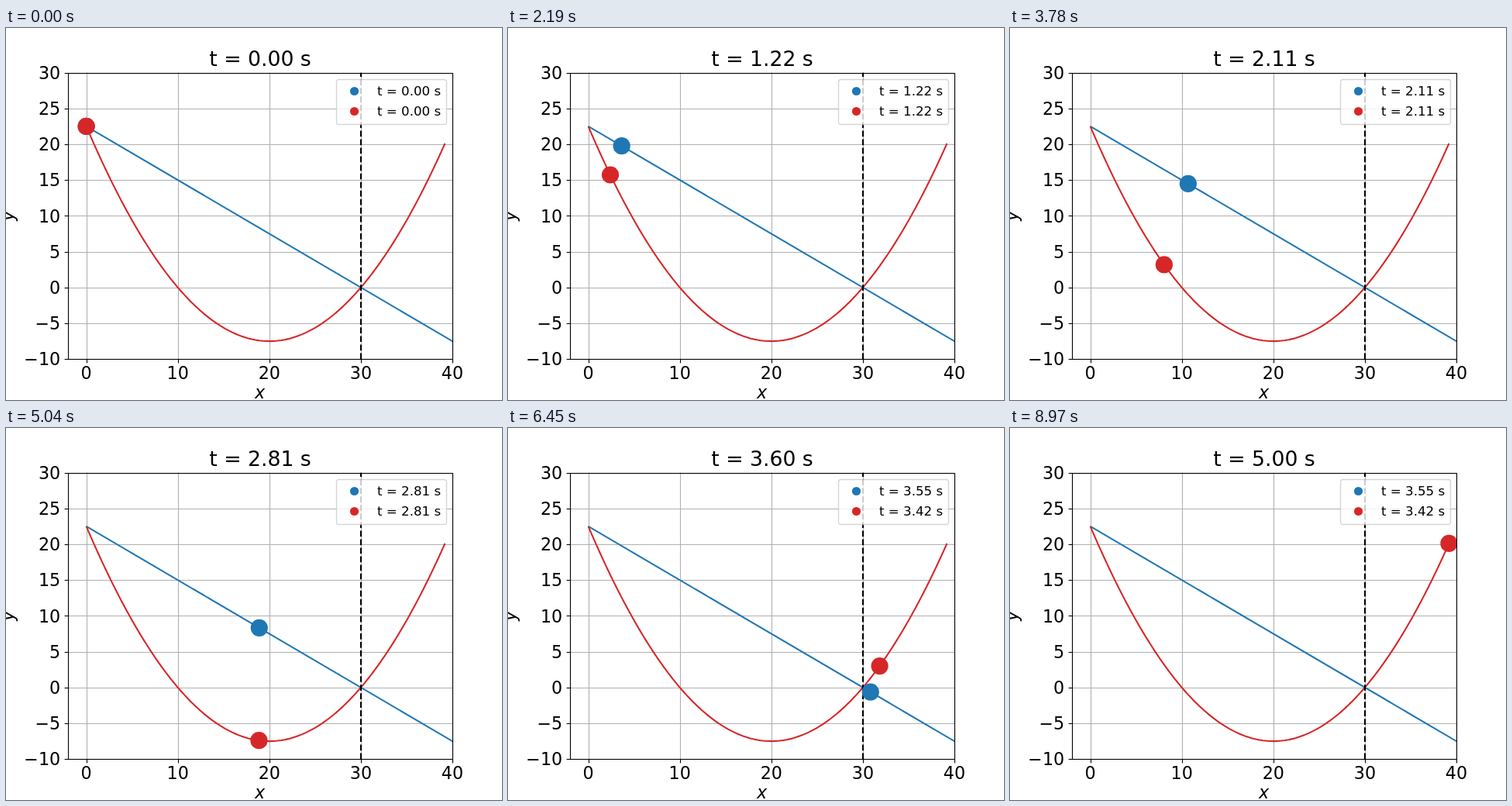
These frames come from a looping animation (640x480 px, 9 s). An HTML page:

```html
<!DOCTYPE html>
<html lang="en">
<head>
<meta charset="utf-8">
<title>Two beads sliding</title>
<style>
  html, body { margin: 0; width: 100%; height: 100%; overflow: hidden; background: #fff; }
  svg { display: block; width: 640px; height: 480px; }
  text { font: 22.22px "DejaVu Sans", sans-serif; fill: #000; white-space: pre; }
  .title { font-size: 26.67px; }
  .key { font-size: 16.67px; }
  .var { font-style: oblique; }
  .mid { text-anchor: middle; }
  .end { text-anchor: end; }
  .curve { fill: none; stroke-width: 2.08; stroke-linejoin: round; }
  .grid { stroke: #b0b0b0; stroke-width: 1.1; }
  .axis { stroke: #000; stroke-width: 1.1; fill: none; }
</style>
</head>
<body>
<svg viewBox="0 0 640 480">
  <clipPath id="area"><rect x="80" y="57.6" width="496" height="369.6"/></clipPath>
  <g id="grid" clip-path="url(#area)"></g>
  <g clip-path="url(#area)">
    <path id="slope" class="curve" stroke="#1f77b4"/>
    <path id="bowl" class="curve" stroke="#d62728"/>
    <path d="M458 427.2V57.6" stroke="#000" stroke-width="2.08" stroke-dasharray="7.71 3.33"/>
    <circle id="blue" r="11.1" fill="#1f77b4"/>
    <circle id="red" r="11.1" fill="#d62728"/>
  </g>
  <g id="ticks"></g>
  <rect class="axis" x="80.5" y="58.5" width="496" height="369"/>
  <text id="title" class="title mid" x="328" y="49"></text>
  <text class="var mid" x="327.5" y="478">x</text>
  <text class="var mid" transform="translate(9.5 242.5) rotate(-90)">y</text>
  <rect x="426.5" y="66.5" width="142" height="58" rx="3.3" fill="#fff" stroke="#ccc" stroke-width="1.39" opacity=".8"/>
  <circle cx="449.5" cy="81.5" r="5.6" fill="#1f77b4"/>
  <circle cx="449.5" cy="107.5" r="5.6" fill="#d62728"/>
  <text id="blueKey" class="key" x="479" y="87"></text>
  <text id="redKey" class="key" x="479" y="113"></text>
</svg>
<script>
const FRAMES = 300, FRAME_MS = 30, DURATION = 5;
const G = 9.81, LEAD = 0.0236, GATE = 30;
const $ = id => document.getElementById(id);

const px = x => 80 + (x + 2) * 496 / 42;
const py = y => 57.6 + (30 - y) * 9.24;
const snap = v => Math.floor(v + 0.5) + 0.5;
const slopeY = x => 22.5 - 0.75 * x;
const bowlY = x => 0.075 * (x - 20) ** 2 - 7.5;

function add(parent, name, attrs, text) {
  const el = document.createElementNS('http://www.w3.org/2000/svg', name);
  for (const key in attrs) el.setAttribute(key, attrs[key]);
  if (text) el.textContent = text;
  $(parent).append(el);
}

for (let x = 0; x <= 40; x += 10) {
  const at = snap(px(x));
  add('grid', 'path', { class: 'grid', d: `M${at} 57V428` });
  add('ticks', 'path', { class: 'axis', d: `M${at} 427.5v4.9` });
  add('ticks', 'text', { class: 'mid', x: px(x), y: 453 }, String(x));
}
for (let y = -10; y <= 30; y += 5) {
  const at = snap(py(y));
  add('grid', 'path', { class: 'grid', d: `M80 ${at}H577` });
  add('ticks', 'path', { class: 'axis', d: `M80.5 ${at}h-4.9` });
  add('ticks', 'text', { class: 'end', x: 70.2, y: Math.round(py(y) + 8.2) }, String(y).replace('-', '\u2212'));
}

// Straight 3-4-5 incline: constant horizontal acceleration.
const accel = G * 0.6 * 0.8;
const blueX = t => accel / 2 * (t + LEAD) ** 2;
const blueGate = Math.sqrt(2 * GATE / accel) - LEAD;

// Parabola with x = 20 + 20 sin(a): energy conservation gives da/dt.
const scale = Math.sqrt(2 * G * 30) / 20;
const rate = a => scale / Math.sqrt(1 + 9 * Math.sin(a) ** 2);
const advance = (a, h) => a + h * rate(a + h / 2 * rate(a));
const bowlX = a => 20 + 20 * Math.sin(a);

const SUB = 20, step = DURATION / (FRAMES - 1) / SUB;
const redX = [];
let redGate = DURATION;
let angle = advance(-Math.PI / 2, LEAD);
for (let i = 0; i < FRAMES * SUB; i++) {
  const x = bowlX(angle);
  if (i % SUB === 0) redX.push(x);
  if (x >= GATE) redGate = Math.min(redGate, i * step);
  angle = advance(angle, step);
}

const trace = (xs, f) => 'M' + xs.map(x => `${px(x).toFixed(2)} ${py(f(x)).toFixed(2)}`).join('L');
$('slope').setAttribute('d', trace([0, 45], slopeY));
$('bowl').setAttribute('d', trace(redX, bowlY));

function place(id, x, y) {
  $(id).setAttribute('cx', px(x));
  $(id).setAttribute('cy', py(y));
}
const label = t => `t = ${t.toFixed(2)} s`;

const start = performance.now();
function draw() {
  const frame = Math.floor((performance.now() - start) / FRAME_MS) % FRAMES;
  const t = DURATION * frame / (FRAMES - 1);
  const bx = blueX(t), rx = redX[frame];
  place('blue', bx, slopeY(bx));
  place('red', rx, bowlY(rx));
  $('title').textContent = label(t);
  $('blueKey').textContent = label(Math.min(t, blueGate));
  $('redKey').textContent = label(Math.min(t, redGate));
  requestAnimationFrame(draw);
}
draw();
</script>
</body>
</html>
```
